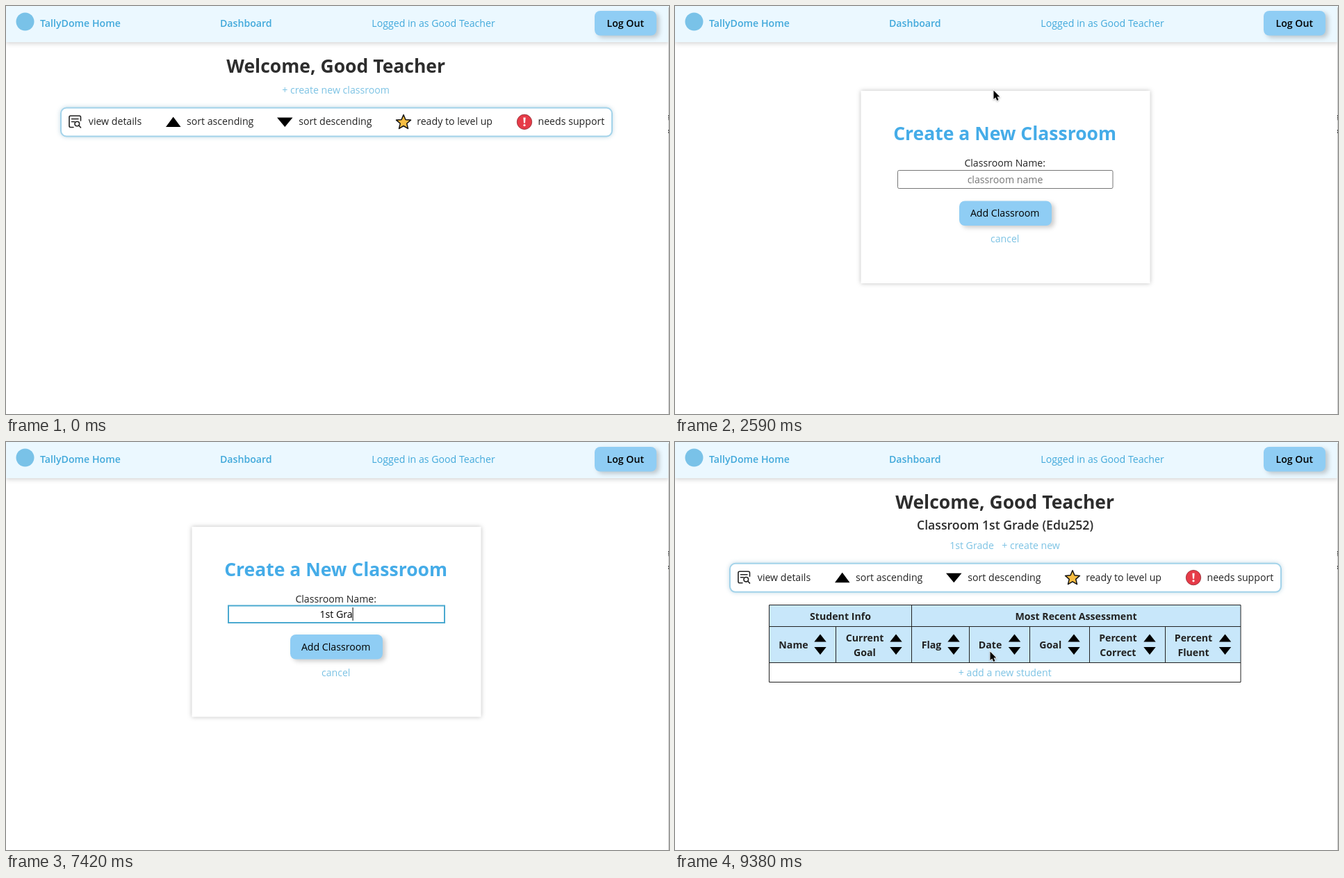
An HTML page for the animation above (9.66 s loop, 954 by 587 pixels).

```html
<!DOCTYPE html>
<html lang="en">
<head>
<meta charset="utf-8">
<title>Classroom dashboard</title>
<style>
  html, body { margin: 0; width: 100%; height: 100%; overflow: hidden; background: #fff; }
  svg { display: block; }
  text { font: 14.15px "Open Sans", "Noto Sans", sans-serif; fill: #222; white-space: pre; }
  .mid { text-anchor: middle; }
  .semi { font-weight: 600; }
  .nav { fill: #42a9db; }
  .link { fill: #7dc3e4; }
  .title { font-size: 26.5px; font-weight: 700; fill: #2d2d2d; }
  .sub { font-size: 17.7px; font-weight: 600; fill: #2d2d2d; }
  .head { font-weight: 700; }
  .button { fill: #8fcdf4; filter: drop-shadow(4px 3px 3px rgba(0, 0, 0, .2)); }
  .line { fill: none; stroke: #222; }
</style>
</head>
<body>
<svg width="954" height="587" viewBox="0 0 954 587">
  <defs>
    <path id="up" d="M0 -5.5L8.7 5.5H-8.7Z"/>
    <path id="down" d="M0 5.5L8.7 -5.5H-8.7Z"/>
  </defs>

  <g id="navbar">
    <rect width="954" height="52" fill="#ebf8ff" style="filter:drop-shadow(0 2px 3px rgba(0,0,0,.17))"/>
    <circle cx="27.5" cy="22.5" r="13" fill="#79c2e8"/>
    <text class="semi nav" x="49" y="30">TallyDome Home</text>
    <text class="semi nav mid" x="345.3" y="30">Dashboard</text>
    <text class="nav mid" x="615" y="30">Logged in as Good Teacher</text>
    <rect class="button" x="847" y="7" width="89" height="35.5" rx="8"/>
    <text class="semi mid" x="891.3" y="30" style="fill:#000">Log Out</text>
  </g>

  <g id="dashboard">
    <text class="title mid" x="474.7" y="95.5">Welcome, Good Teacher</text>
    <text id="create" class="link mid" x="474.6" y="125.5">+ create new classroom</text>
    <g id="legend">
      <rect x="79" y="146.5" width="793" height="41" rx="8" fill="#fff" stroke="#a3d3ea" stroke-width="2"
        style="filter:drop-shadow(0 0 3px rgba(120,170,195,.45))"/>
      <g class="line" stroke-width="1.6" stroke-linecap="round" stroke-linejoin="round">
        <path d="M97 174.5H93Q91 174.5 91 172.5V160Q91 158 93 158H105.5Q107.5 158 107.5 160V165M94.5 162.5H104M94.5 166.5H98.5"/>
        <circle cx="102.3" cy="169.5" r="3.3"/>
        <path d="M104.8 172L107.5 174.8"/>
      </g>
      <path d="M240.7 159.5L251.5 174H230Z"/>
      <path d="M401.3 174L390 160.5H412.5Z"/>
      <path id="star" fill="#f7bd42" stroke="#111" stroke-width="1.5" stroke-linejoin="round"/>
      <circle cx="746" cy="166.8" r="10.7" fill="#e63b48" stroke="#8d2a32" stroke-width=".8"/>
      <path d="M744.4 160.5H747.6L747 168.5H745Z" fill="#fff"/>
      <circle cx="746" cy="171.5" r="1.6" fill="#fff"/>
      <text x="118.8" y="171.3">view details</text>
      <text x="260" y="171.3">sort ascending</text>
      <text x="421.3" y="171.3">sort descending</text>
      <text x="591.2" y="171.3">ready to level up</text>
      <text x="765.5" y="171.3">needs support</text>
    </g>
    <g id="classroom">
      <text class="sub mid" x="475" y="125.5">Classroom 1st Grade (Edu252)</text>
      <text class="link mid" x="427" y="153.5">1st Grade</text>
      <text class="link mid" x="512" y="153.5">+ create new</text>
      <rect x="135.5" y="235" width="678.5" height="82.5" fill="#c8e7fa"/>
      <path class="line" d="M135.5 234.5H814V345.5H135.5ZM135.5 265.5H814M135.5 317.5H814M340.5 234.5V317.5M231.5 265.5V317.5M423.5 265.5V317.5M510.5 265.5V317.5M596.5 265.5V317.5M705.5 265.5V317.5"/>
      <text class="head mid" x="238" y="255.5">Student Info</text>
      <text class="head mid" x="577" y="255.5">Most Recent Assessment</text>
      <g id="columns"></g>
      <text class="link mid" x="474.7" y="336.5">+ add a new student</text>
    </g>
  </g>

  <g id="form">
    <rect id="card" x="267.5" y="122" width="416" fill="#fff" style="filter:drop-shadow(0 0 3px rgba(0,0,0,.26))"/>
    <text class="title mid" x="474.6" y="192.5" style="fill:#45ace8">Create a New Classroom</text>
    <text class="mid" x="474.7" y="230.8">Classroom Name:</text>
    <rect id="field" fill="#fff"/>
    <text id="value" class="mid" x="475"></text>
    <rect id="caret" width="1" height="19" y="238"/>
    <g id="actions">
      <rect id="add" class="button" x="409" y="280.5" width="133" height="35.5" rx="8"/>
      <text id="addLabel" class="mid" x="474.7" y="303.3">Add Classroom</text>
      <text class="link mid" x="474.7" y="340.3">cancel</text>
    </g>
  </g>

  <path d="M953.5 2V587" stroke="#c9c9c9"/>
  <path d="M953.5 157V164M953.5 178V183" stroke="#333" stroke-dasharray="2 1"/>

  <g id="cursor" style="filter:drop-shadow(0 1px 1px rgba(0,0,0,.3))">
    <path id="arrow" d="M.5 .5V13L3.3 10.4L5.3 15L7.5 14L5.5 9.5H9.3Z" stroke="#fff" stroke-width="1.4" paint-order="stroke"/>
    <path id="beam" d="M-3 -8Q0 -8 0 -6V6Q0 8 -3 8M3 -8Q0 -8 0 -6M0 6Q0 8 3 8M-2 2H2" fill="none" stroke="#222"/>
  </g>
</svg>
<script>
const LOOP = 9660, STEP = 70;
const FORM_OPEN = 2450, FOCUS = 3850, SUBMIT = 9100, LOADED = 9380;
const NAME = "1st Grade";
const KEY_TIMES = [5880, 6160, 6300, 6860, 7070, 7210, 7350, 7490, 7630];
const BLINK = 490, BLINK_START = 3990;

// Pointer route: time, x, y
const ROUTE = [
  [210, 460, 568], [420, 424, 242], [630, 425, 238], [900, 515, 192], [1080, 568, 115],
  [1150, 564, 84], [1260, 558, 138], [1470, 558, 138], [1680, 447, 138], [1890, 447, 138],
  [1960, 453, 123], [2030, 455, 121], [2170, 458, 121], [2730, 458, 121], [3080, 474, 180],
  [3570, 440, 249], [4060, 440, 249], [4480, 393, 275], [4690, 389, 277], [5810, 389, 277],
  [8330, 389, 277], [8400, 395, 285], [8610, 428, 305], [8890, 453, 301], [LOOP, 453, 301]
];

const el = Object.fromEntries([...document.querySelectorAll("[id]")].map(node => [node.id, node]));
const set = (node, attrs) => Object.entries(attrs).forEach(([key, val]) => node.setAttribute(key, val));
const show = (node, on) => node.setAttribute("display", on ? "inline" : "none");

function buildStar() {
  const points = Array.from({ length: 10 }, (_, i) => {
    const radius = i % 2 ? 5 : 11, angle = i * Math.PI / 5;
    return `${572 + radius * Math.sin(angle)} ${167.5 - radius * Math.cos(angle)}`;
  });
  el.star.setAttribute("d", `M${points.join("L")}Z`);
}

function buildColumns() {
  const columns = [
    ["Name", 170.5, 209], ["Current Goal", 273, 318], ["Flag", 369, 401], ["Date", 453.5, 488.5],
    ["Goal", 540.3, 574], ["Percent Correct", 637.4, 683], ["Percent Fluent", 746, 791.5]
  ];
  el.columns.innerHTML = columns.map(([label, x, arrowX]) => {
    const words = label.split(" ");
    const first = words.length > 1 ? 286.5 : 297;
    return words.map((word, i) =>
      `<text class="head mid" x="${x}" y="${first + i * 21}">${word}</text>`).join("") +
      `<use href="#up" x="${arrowX}" y="282"/><use href="#down" x="${arrowX}" y="300.5"/>`;
  }).join("");
}

function pointerAt(t) {
  const i = Math.max(1, ROUTE.findIndex(point => point[0] >= t));
  const [t0, x0, y0] = ROUTE[i - 1], [t1, x1, y1] = ROUTE[i];
  const k = Math.min(1, Math.max(0, (t - t0) / (t1 - t0)));
  return { x: x0 + (x1 - x0) * k, y: y0 + (y1 - y0) * k };
}

function drawDashboard(t) {
  const hover = t >= 1960 && t < FORM_OPEN;
  const loaded = t >= LOADED;
  show(el.create, !loaded);
  show(el.classroom, loaded);
  el.create.style.fontSize = hover ? "14.85px" : "14.15px";
  el.create.setAttribute("y", hover ? 126.3 : 125.5);
  el.legend.setAttribute("transform", `translate(0 ${loaded ? 28.3 : hover ? 1 : 0})`);
}

function drawForm(t, pointer) {
  const focused = t >= FOCUS;
  set(el.card, { height: focused ? 273.5 : 277 });
  set(el.field, focused
    ? { x: 320, y: 235.5, width: 311, height: 24.5, rx: 0, stroke: "#4ba9d0", "stroke-width": 2 }
    : { x: 320.5, y: 236.5, width: 309.5, height: 26, rx: 2, stroke: "#767676", "stroke-width": 1 });
  el.actions.setAttribute("transform", `translate(0 ${focused ? -3.5 : 0})`);

  const typed = KEY_TIMES.filter(time => time <= t).length;
  el.value.textContent = typed ? NAME.slice(0, typed) : "classroom name";
  el.value.style.fill = typed ? "#000" : "#757575";
  el.value.setAttribute("y", focused ? 252.5 : 254.5);

  const since = t - (typed ? KEY_TIMES[typed - 1] : BLINK_START);
  show(el.caret, focused && Math.floor(Math.max(0, since) / BLINK) % 2 === 0);
  el.caret.setAttribute("x", 475 + (typed ? el.value.getComputedTextLength() / 2 : 0));

  const hover = t >= 8400 && pointer.x >= 409;
  el.add.style.fill = hover ? "#45adea" : "";
  el.addLabel.style.fill = hover ? "#fff" : "#000";
  el.addLabel.style.fontWeight = hover ? 600 : 400;
}

function draw(time) {
  const t = Math.floor(time % LOOP / STEP) * STEP;
  const pointer = pointerAt(t);
  const formOpen = t >= FORM_OPEN && t < SUBMIT;
  show(el.dashboard, !formOpen);
  show(el.form, formOpen);
  if (formOpen) drawForm(t, pointer);
  else drawDashboard(t);

  const overField = formOpen && pointer.y > 236 && pointer.y < 261 && pointer.x > 320;
  show(el.cursor, t >= 210 && (t < 5810 || t >= 8400));
  show(el.arrow, !overField);
  show(el.beam, overField);
  el.cursor.setAttribute("transform", `translate(${pointer.x} ${pointer.y})`);
}

buildStar();
buildColumns();
const start = performance.now();
function tick() {
  draw(performance.now() - start);
  requestAnimationFrame(tick);
}
tick();
</script>
</body>
</html>
```
